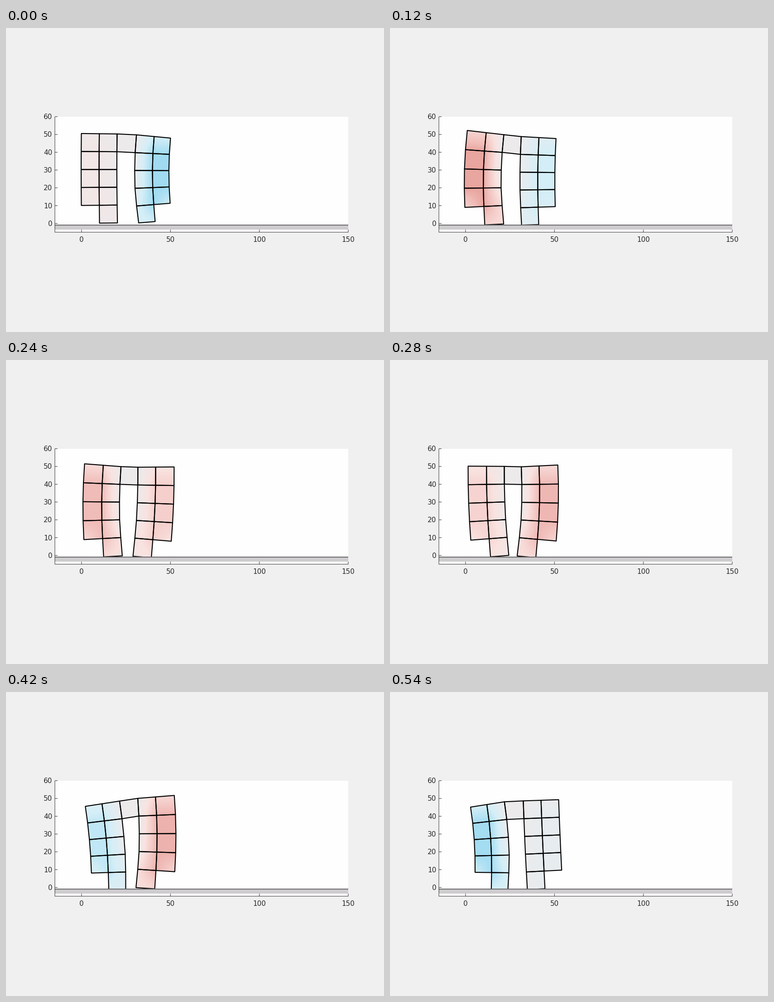
These frames come from a looping animation (835x671 px, 0.56 s). A matplotlib script:

```python
import numpy as np
import matplotlib.pyplot as plt
from matplotlib.animation import FuncAnimation
from matplotlib.collections import PolyCollection
from matplotlib.patches import Rectangle

W, H, DPI = 835, 671, 100
FRAMES, STEP = 28, 20
CELL = 39.25          # rest size of a voxel in pixels
SUB = 12              # shading steps per voxel side
BEND = 0.045          # row tilt per unit of actuation
ROWS = np.arange(6)   # vertex rows from the foot up

# Colour stops from full contraction through rest to full expansion.
LEVELS = [-1, -0.5, -0.08, 0, 0.3, 0.75, 1]
COLORS = np.array([(160, 219, 241), (212, 238, 247), (231, 236, 239),
                   (236, 234, 235), (249, 226, 223), (240, 188, 184),
                   (230, 157, 150)]) / 255

# Share of the strain at each vertex: full inside, half at the free ends.
STRAIN = np.stack([0.5 + 0.5 * (abs(ROWS - 3) < 2),
                   0.5 + 0.5 * (abs(ROWS - 2.5) < 2),
                   np.clip(0.9 - 0.4 * ROWS, 0, 0.4)], 1)


def rgb(*c):
    return tuple(v / 255 for v in c)


def shade(values):
    return np.stack([np.interp(values, LEVELS, c) for c in COLORS.T], -1)


def wave(t, peak, period):
    return np.cos(2 * np.pi * (t - peak) / period)


def ramp(t, centre, width):
    return np.tanh((t - centre) / width)


def left_pose(t):
    """Centre and tilt of the left leg, which steps forward in mid-cycle."""
    return (214 + 8.5 * ramp(t, 275, 112),
            317.8 + 5.5 * ramp(t, 330, 75),
            -0.03 + 0.063 * np.tanh(2 * wave(t, 125, 600)))


def right_pose(t):
    """Centre and tilt of the right leg, which slides and rocks once."""
    rock = np.exp(-((t - 217) / 72) ** 2)
    return (323.5 + 0.0243 * t,
            315.6 + 3.2 * wave(t, 143, 480),
            0.005 + 0.038 * rock - 0.048 * (t / 540) ** 6)


def leg(pose, a, side):
    """Vertices [row, outer/middle/inner, xy]; side is -1 left, +1 right."""
    x, y, tilt = pose
    ang = tilt - side * BEND * a * (np.maximum(ROWS, 1.1) - 3)
    mid = (ang[:-1] + ang[1:]) / 2
    rise = CELL * (1 + 0.042 * a)
    step = rise * np.stack([np.sin(mid), -np.cos(mid)], -1)
    spine = np.vstack([[0, 0], np.cumsum(step, axis=0)])
    spine += np.array([x, y]) - spine[3]
    out = side * np.stack([np.cos(ang), np.sin(ang)], -1)
    outer = CELL * (1 + 0.075 * a)
    inner = CELL * (1 + a * np.clip(0.07 - 0.04 * ROWS, 0, 1))
    return np.stack([spine + out * outer, spine, spine - out * inner[:, None]], 1)


def corners(grid, r, c):
    return np.array([grid[r, c], grid[r, c + 1], grid[r + 1, c + 1], grid[r + 1, c]])


def body(t):
    """Corner points and corner strains of all voxels."""
    cells, strains, legs = [], [], []
    for pose, peak, side in ((left_pose, 160, -1), (right_pose, 354, 1)):
        a = wave(t, peak, 700)
        grid = leg(pose(t), a, side)
        legs.append(grid)
        for r in range(5):
            for c in (0, 1):
                if r or c:
                    cells.append(corners(grid, r, c))
                    strains.append(corners(STRAIN * a, r, c))
    lft, rgt = legs
    cells.append(np.array([lft[4, 2], rgt[4, 2], rgt[5, 2], lft[5, 2]]))
    strains.append(np.zeros(4))
    return np.array(cells), np.array(strains)


def blend(q, u, v):
    """Bilinear mix of the four corners at every (u, v)."""
    wts = np.stack([(1 - u) * (1 - v), u * (1 - v), u * v, (1 - u) * v], -1)
    return np.einsum("ijk,nk...->nij...", wts, q)


EDGE = np.meshgrid(np.linspace(0, 1, SUB + 1), np.linspace(0, 1, SUB + 1))
MID = np.meshgrid((np.arange(SUB) + 0.5) / SUB, (np.arange(SUB) + 0.5) / SUB)

fig = plt.figure(figsize=(W / DPI, H / DPI), dpi=DPI, facecolor=rgb(240, 240, 240))
ax = fig.add_axes([0, 0, 1, 1])
ax.set_xlim(0, W)
ax.set_ylim(H, 0)
ax.axis("off")

X0, X1, Y0, Y1 = 108, 756, 196, 451
UNIT = (X1 - X0) / 165
INK = rgb(38, 38, 38)


def box(x, y, w, h, color, z):
    ax.add_patch(Rectangle((x, y), w, h, fc=color, ec="none", lw=0, zorder=z))


def rule(xs, ys):
    ax.plot(xs, ys, color=INK, lw=0.7, zorder=6, solid_capstyle="butt", snap=False)


def label(x, y, value, align):
    ax.text(x, y + 5.5, str(value), fontsize=11, family="DejaVu Sans",
            color=INK, ha=align, va="baseline", zorder=6)


box(X0, Y0, X1 - X0, Y1 - Y0, rgb(254, 254, 254), 0)
box(X0, 435, X1 - X0, 10, rgb(206, 204, 206), 4)
box(X0, 434, X1 - X0, 2, rgb(108, 105, 108), 5)
rule([X0, X0], [Y0, Y1])
rule([X0, X1], [Y1 - 0.25] * 2)
for value in range(0, 61, 10):
    y = Y1 - (value + 5) * UNIT
    rule([X0, X0 + 6], [y, y])
    label(102.5, y, value, "right")
for value in range(0, 151, 50):
    x = X0 + (value + 15) * UNIT
    rule([x, x], [Y1 - 6, Y1])
    label(x, 467, value, "center")

fill = PolyCollection([], antialiased=False, linewidths=0, zorder=2)
mesh = PolyCollection([], facecolors="none", edgecolors="black",
                      linewidths=1.55, joinstyle="round", zorder=3)
ax.add_collection(fill, autolim=False)
ax.add_collection(mesh, autolim=False)


def draw(i):
    cells, strains = body(i * STEP)
    p = blend(cells, *EDGE)
    quads = np.stack([p[:, :-1, :-1], p[:, :-1, 1:], p[:, 1:, 1:], p[:, 1:, :-1]], 3)
    fill.set_verts(quads.reshape(-1, 4, 2))
    fill.set_facecolor(shade(blend(strains, *MID).ravel()))
    mesh.set_verts(cells)
    return fill, mesh


anim = FuncAnimation(fig, draw, frames=FRAMES, interval=STEP, repeat=True,
                     repeat_delay=0, blit=False)
plt.show()
```
